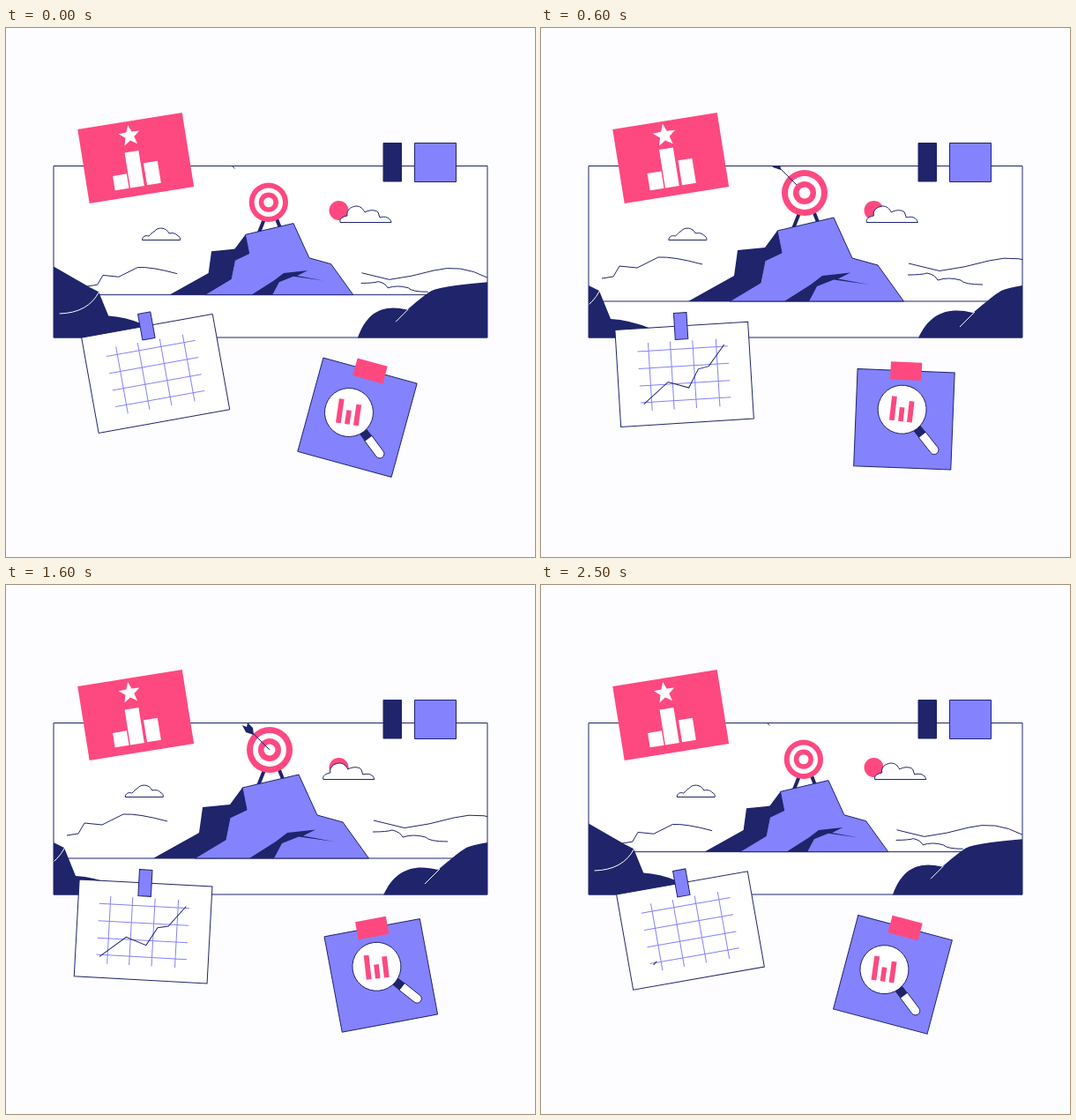
Write an HTML page that moves like this. It is 600x600 px and loops after 2600 ms.

```html
<!DOCTYPE html>
<html lang="en">
<head>
<meta charset="utf-8">
<title>Goal board</title>
<style>
  html, body { margin: 0; width: 100%; height: 100%; overflow: hidden; background: #fdfcfe; }
  svg { display: block; width: 100%; height: 100%; }
  svg * { vector-effect: non-scaling-stroke; }
  .navy { fill: #1f246b; }
  .purple { fill: #8482fc; }
  .red { fill: #fd4980; }
  .white { fill: #fff; }
  .none { fill: none; }
  .line { stroke: #1f246b; stroke-width: 1; }
  .pale { stroke: #fff; stroke-width: 1; fill: none; }
  .grid { stroke: #8482fc; stroke-width: 1; fill: none; }
</style>
</head>
<body>
<svg viewBox="0 0 600 600">
  <clipPath id="frame"><rect x="54" y="156" width="492" height="195.5"/></clipPath>
  <rect class="white" x="54" y="156.5" width="492" height="194.5"/>

  <g clip-path="url(#frame)">
    <g id="far" class="none line">
      <path d="M69 284L82 282 89 270 109 272 133 260Q150 259 183 268"/>
      <path d="M417 267L452 275.5Q480 272 508 264 542 255 576 273"/>
      <path d="M416 280Q432 280 438 278 447 280 450 286 462 282 476 286 480 291 501 291"/>
    </g>
    <circle class="red" cx="377.5" cy="207" r="11"/>
    <g id="clouds" class="white line">
      <path d="M154.5 240.5C155 236 158 235 162 236 164 235 166 231 168 231 172 225 182 226 185 233 189 232 193 233 194 235 197 236 198 239 197.5 240.5Z"/>
      <path d="M379 220.5C378 216 382 214 387 213 386 207 390 203 397 202 402 202 405 205 407 209 412 206 419 206 422 209 423 211 423 213 424 215 430 213 436 215 437 220.5Z"/>
    </g>
    <g id="peak">
      <path class="line" d="M-100 310H700"/>
      <path d="M295 205L285 230M308 205L318 230" stroke="#1f246b" stroke-width="4"/>
      <path class="navy" d="M167 310L219 281 223 252 254 249 268 230 290 250 260 310Z"/>
      <path class="purple line" d="M268 230L332 215 353 261 382 269 411.5 310H214L249 289 254 264 273 255Z"/>
      <path class="navy" d="M276 310L306 291 319 281 351 277.5 337 284.5 372 291 332 285.5 313 293 304 310Z"/>
      <circle class="red" cx="299" cy="187" r="26"/>
      <circle class="white" cx="299" cy="187" r="19"/>
      <circle class="red" cx="299" cy="187" r="13"/>
      <circle class="white" cx="299" cy="187" r="6.5"/>
      <g id="arrow">
        <path class="line" d="M299 187L275 163"/>
        <path class="navy" d="M281 170L272 167 268 159 273 161 274 156 280 162Z"/>
      </g>
    </g>
    <g id="leftHill">
      <path class="navy" d="M0 261L54 292 66 298 79 330Q100 331 125 341L160 354V380H0Z"/>
      <path class="pale" d="M14 327Q52 326 66.5 298"/>
    </g>
    <g id="rightHill">
      <path class="navy" d="M418 380L424 362C436 326 458 315 490 323 501 314 512 304 522 298Q536 291 600 286V380Z"/>
      <path class="pale" d="M475 339L492 322"/>
    </g>
  </g>
  <rect class="none line" x="54" y="156.5" width="492" height="194.5"/>

  <rect class="navy line" x="428" y="130.5" width="20.5" height="43.5"/>
  <rect class="purple line" x="463.5" y="130.5" width="47" height="44"/>

  <g transform="translate(147.2 147.5) rotate(-9.1)">
    <rect class="red" x="-60" y="-42.5" width="120" height="85"/>
    <path id="podium" class="white"/>
    <path id="star" class="white"/>
  </g>

  <g id="chart">
    <rect class="white line" x="-75" y="6" width="151" height="110"/>
    <path class="grid" d="M-38.4 23V100M-13.4 23V100M12 23V100M38.5 23V100M-51 32H51.5M-51 51.5H51.5M-51 71H51.5M-51 90H51.5"/>
    <path id="trend" class="none line" pathLength="1" d="M-47.4 92L-18.4 68.5 4.6 76.5 16.6 56 28.6 53.5 47.6 30"/>
    <rect class="purple line" x="-7.4" y="-9" width="14.5" height="30"/>
  </g>

  <g id="note">
    <rect class="purple line" x="-55.2" y="4.8" width="110.2" height="110.2"/>
    <g id="lens">
      <g transform="rotate(45)">
        <path class="white line" d="M36-5H58.5A5 5 0 0 1 58.5 5H36Z"/>
        <rect class="navy" x="26" y="-5" width="11" height="10"/>
      </g>
      <circle class="white line" r="27.5"/>
      <path class="red" d="M-13.2-14h5.8v27.5h-5.8ZM-3-2.5h5.6v16h-5.6ZM7-10.5h5.8v24h-5.8Z"/>
    </g>
    <rect class="red" x="-17.7" y="-5" width="35.3" height="20.3"/>
  </g>
</svg>
<script>
const LOOP = 2600, STEP = 100;
const $ = id => document.getElementById(id);
const put = (id, value) => $(id).setAttribute('transform', value);
const mix = (a, b, k) => a + (b - a) * k;
const ease = p => (1 - Math.cos(Math.PI * p)) / 2;

// Eased value between [time, value] keys
function keyed(t, ...keys) {
  const i = keys.findIndex(k => k[0] > t);
  if (i < 0) return keys.at(-1)[1];
  if (i === 0) return keys[0][1];
  const [t0, a] = keys[i - 1], [t1, b] = keys[i];
  return mix(a, b, ease((t - t0) / (t1 - t0)));
}
// Rises during a..b, falls during c..d
const pulse = (t, a, b, c, d) => keyed(t, [a, 0], [b, 1], [c, 1], [d, 0]);

function zoom(id, z, scale, x, y) {
  const s = mix(scale, 1, z);
  put(id, `matrix(${s} 0 0 ${s} ${x * (1 - z)} ${y * (1 - z)})`);
}

function starPath(y, r) {
  let d = '';
  for (let i = 0; i < 10; i++) {
    const a = i * Math.PI / 5, q = i % 2 ? r * 0.42 : r;
    d += `${i ? 'L' : 'M'}${-3 + q * Math.sin(a)} ${y - q * Math.cos(a)}`;
  }
  return d + 'Z';
}

const bar = (x, top) => `M${x} ${top}h16V32.5h-16Z`;

function draw(t) {
  const swing = Math.cos(2 * Math.PI * t / LOOP);

  const z = pulse(t, 0, 610, 1750, 2450);
  zoom('far', z, 0.895, 30.3, 38.8);
  zoom('peak', z, 0.853, 42.8, 38.2);
  zoom('leftHill', z, 0.855, 48.7, 44.4);
  zoom('rightHill', z, 0.855, 35.9, 43.4);
  put('clouds', `translate(${11 * (swing - 1)} 0)`);

  const d = 45 * (1 - pulse(t, 480, 650, 1780, 1950));
  put('arrow', `translate(${-d} ${-d})`);

  const g = pulse(t, 0, 300, 1250, 1550);
  $('podium').setAttribute('d',
    bar(-29, 16 - 3 * g) + bar(-11.5, -8 - 3.5 * g) + bar(7.8, 7 - 3 * g));
  $('star').setAttribute('d', starPath(-26 - 0.5 * g, 12.5 + g));

  put('chart', `translate(158.4 332) rotate(${-2.6 + -7.6 * swing})`);
  const drawn = pulse(t, 0, 580, 1830, 2600);
  $('trend').style.display = drawn > 0 ? '' : 'none';
  // Dash lengths in user units, since the stroke does not scale
  const len = 127.9;
  $('trend').removeAttribute('pathLength');
  $('trend').setAttribute('stroke-dasharray', `${drawn * len} ${len * 2}`);

  put('note', `translate(414.4 384) rotate(${0.5 + 14.8 * swing})`);
  const k = keyed(t, [0, 0], [400, 1], [750, 0.84], [1200, 0.94], [1750, 0.87], [2550, 0]);
  put('lens', `translate(${mix(-10.8, -2, k)} ${mix(56.9, 48, k)}) rotate(${mix(-7, 5.5, k)})`);
}

const start = performance.now();
function tick() {
  const t = (performance.now() - start) % LOOP;
  draw(Math.floor(t / STEP) * STEP);
  requestAnimationFrame(tick);
}
tick();
</script>
</body>
</html>
```
